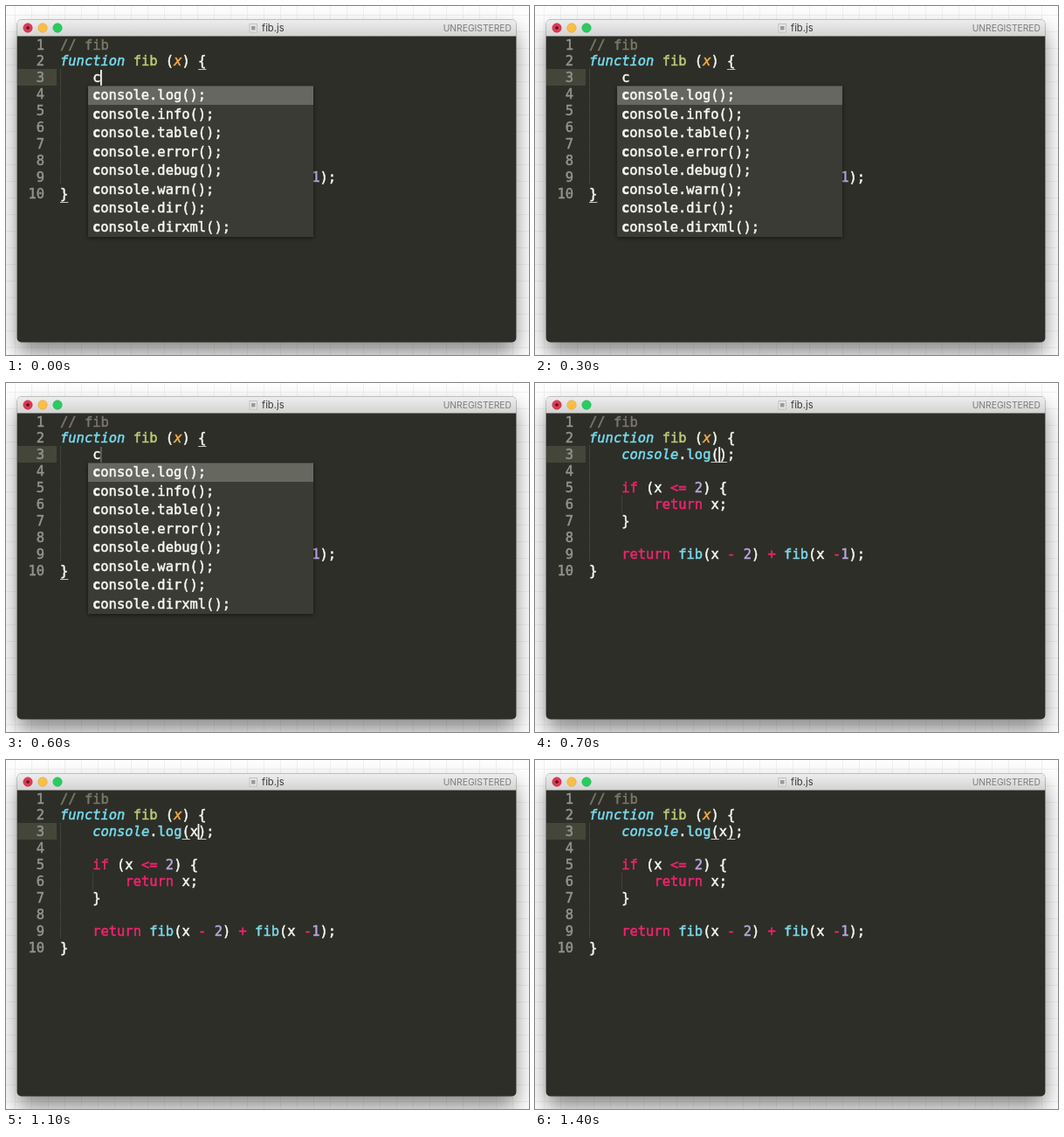
Animation of 599x399 px, one loop 1.5 s. Source, as an HTML page:

```html
<!DOCTYPE html>
<html lang="en">
<head>
<meta charset="utf-8">
<title>fib.js</title>
<style>
  html, body { margin: 0; width: 100%; height: 100%; overflow: hidden; background: #fff; }
  svg { display: block; width: 599px; height: 399px; }
  text { white-space: pre; }
  .mono { font: 15.45px "DejaVu Sans Mono", monospace; color: #f8f8f2; }
  .mono text, .mono tspan { fill: currentColor; stroke: currentColor; stroke-width: .5px; }
  .ui { font-family: Inter, sans-serif; }
  .num { color: #93948e; text-anchor: end; }
  .comment { color: #7a7768; }
  .type { color: #76dbf0; font-style: italic; }
  .call { color: #7cd8ea; }
  .name { color: #bccb78; }
  .arg { color: #f7ab45; font-style: italic; }
  .op { color: #ee2470; }
  .lit { color: #b8a6dd; }
  .guide { stroke: #55564c; stroke-dasharray: 1 1; }
  .mark { stroke: #c9c9c2; }
</style>
</head>
<body>
<svg viewBox="0 0 599 399">
  <defs>
    <pattern id="grid" x="10" y="10" width="19" height="19" patternUnits="userSpaceOnUse">
      <path d="M.5 0V19M0 .5H19" stroke="#f0f0f1" fill="none"/>
    </pattern>
    <linearGradient id="bar" x2="0" y2="1">
      <stop stop-color="#eeeeee"/>
      <stop offset="1" stop-color="#d3d3d3"/>
    </linearGradient>
    <filter id="soft" x="-15%" y="-15%" width="130%" height="135%">
      <feGaussianBlur stdDeviation="12"/>
    </filter>
    <filter id="near" x="-10%" y="-10%" width="120%" height="120%">
      <feGaussianBlur stdDeviation="2.5"/>
    </filter>
  </defs>

  <rect width="599" height="399" fill="#fdfdfd"/>
  <rect width="599" height="399" fill="url(#grid)"/>
  <rect x="13" y="29" width="571" height="368" rx="6" opacity=".46" filter="url(#soft)"/>

  <rect x="12.6" y="15.6" width="571.8" height="368.8" rx="5" fill="#2d2e27"/>
  <path d="M12.6 34.5V20.6a5 5 0 0 1 5-5H579.4a5 5 0 0 1 5 5V34.5Z" fill="url(#bar)"/>
  <g stroke-width=".6">
    <circle cx="25" cy="25" r="5.2" fill="#dc3a54" stroke="#c63049"/>
    <circle cx="42" cy="25" r="5.2" fill="#fbbe45" stroke="#dfa53a"/>
    <circle cx="59" cy="25" r="5.2" fill="#2acb60" stroke="#25b355"/>
  </g>
  <circle cx="25" cy="25" r="1.8" fill="#5e0a18"/>
  <rect x="279" y="20.5" width="8.5" height="9.5" fill="#e6e6e6" stroke="#c2c2c2"/>
  <rect x="281" y="23" width="4.5" height="4.5" fill="#9b9b9b"/>
  <text class="ui" x="293" y="29.2" font-size="11.2" fill="#3c3c3c">fib.js</text>
  <text class="ui" x="579" y="29" font-size="10.3" text-anchor="end" fill="#7c7c7c">UNREGISTERED</text>

  <rect x="13" y="72" width="45" height="19" fill="#44463a"/>
  <path class="guide" d="M62.5 72V204M99.5 129V148"/>
  <g id="code" class="mono"></g>
  <path id="marks" class="mark"/>
  <rect id="caret" y="73" width="1.8" height="18" fill="#f8f8f0"/>

  <g id="popup">
    <rect x="94" y="93" width="258" height="172" opacity=".55" filter="url(#near)"/>
    <rect x="94" y="91.5" width="258" height="172.5" fill="#3a3b35"/>
    <rect x="94" y="91.5" width="258" height="21.5" fill="#66675f"/>
    <g id="list" class="mono"></g>
  </g>
</svg>
<script>
const $ = id => document.getElementById(id);
const LEFT = 62, CHAR = 9.3, PITCH = 18.95, BASE = 49.5;
const colX = col => LEFT + col * CHAR;
const escapeText = s => s.replace(/</g, '&lt;');
const span = (cls, s) => `<tspan class="${cls}">${escapeText(s)}</tspan>`;
const row = (x, y, body, attrs = '') => `<text x="${x}" y="${y}" ${attrs}>${body}</text>`;

const ret = span('op', 'return');
const fib = span('call', 'fib');
const minus = span('op', '-');
const two = span('lit', '2');

// Each line: indent column, markup
const lines = [
  [0, span('comment', '// fib')],
  [0, `${span('type', 'function')} ${span('name', 'fib')} (${span('arg', 'x')}) {`],
  [4, ''],
  [0, ''],
  [4, `${span('op', 'if')} (x ${span('op', '<=')} ${two}) {`],
  [8, `${ret} x;`],
  [4, '}'],
  [0, ''],
  [4, `${ret} ${fib}(x ${minus} ${two}) ${span('op', '+')} ${fib}(x ${minus}${span('lit', '1')});`],
  [0, '}']
];
$('code').innerHTML = lines.map(([col, body], i) => {
  const y = BASE + i * PITCH;
  return row(44, y, i + 1, 'class="num"') + row(colX(col), y, body, `id="line${i + 1}"`);
}).join('');

const methods = ['log', 'info', 'table', 'error', 'debug', 'warn', 'dir', 'dirxml'];
$('list').innerHTML = methods.map((m, i) =>
  row(99, 107.2 + i * 21.5, `<tspan font-weight="bold">c</tspan>onsole.${m}();`)).join('');

const call = arg => `${span('type', 'console')}.${span('call', 'log')}(${arg});`;
const underline = (col, y) => `M${colX(col)} ${y}h${CHAR}`;

const states = [
  { from: 0, text: 'c', caret: 5, popup: true, marks: underline(17, 72.5) + underline(0, 224.5) },
  { from: 7, text: call(''), caret: 16, marks: underline(15, 90.5) + underline(16, 90.5) },
  { from: 11, text: call('x'), caret: 17, marks: underline(15, 90.5) + underline(17, 90.5) }
];
const STEP = 100, LOOP = 1500;
const blink = [1, .6, .2, 0, 0, .1, .25, 1, .45, 0, .2, 1, .6, .2, 0];

let shown;
function show(state) {
  shown = state;
  $('line3').innerHTML = state.text;
  $('marks').setAttribute('d', state.marks);
  $('caret').setAttribute('x', colX(state.caret) - .5);
  $('popup').style.display = state.popup ? '' : 'none';
}

const start = performance.now();
function draw(now) {
  const step = Math.floor(Math.max(0, now - start) % LOOP / STEP);
  const state = states.filter(s => s.from <= step).pop();
  if (state !== shown) show(state);
  $('caret').setAttribute('opacity', blink[step]);
  requestAnimationFrame(draw);
}
draw(start);
</script>
</body>
</html>
```
